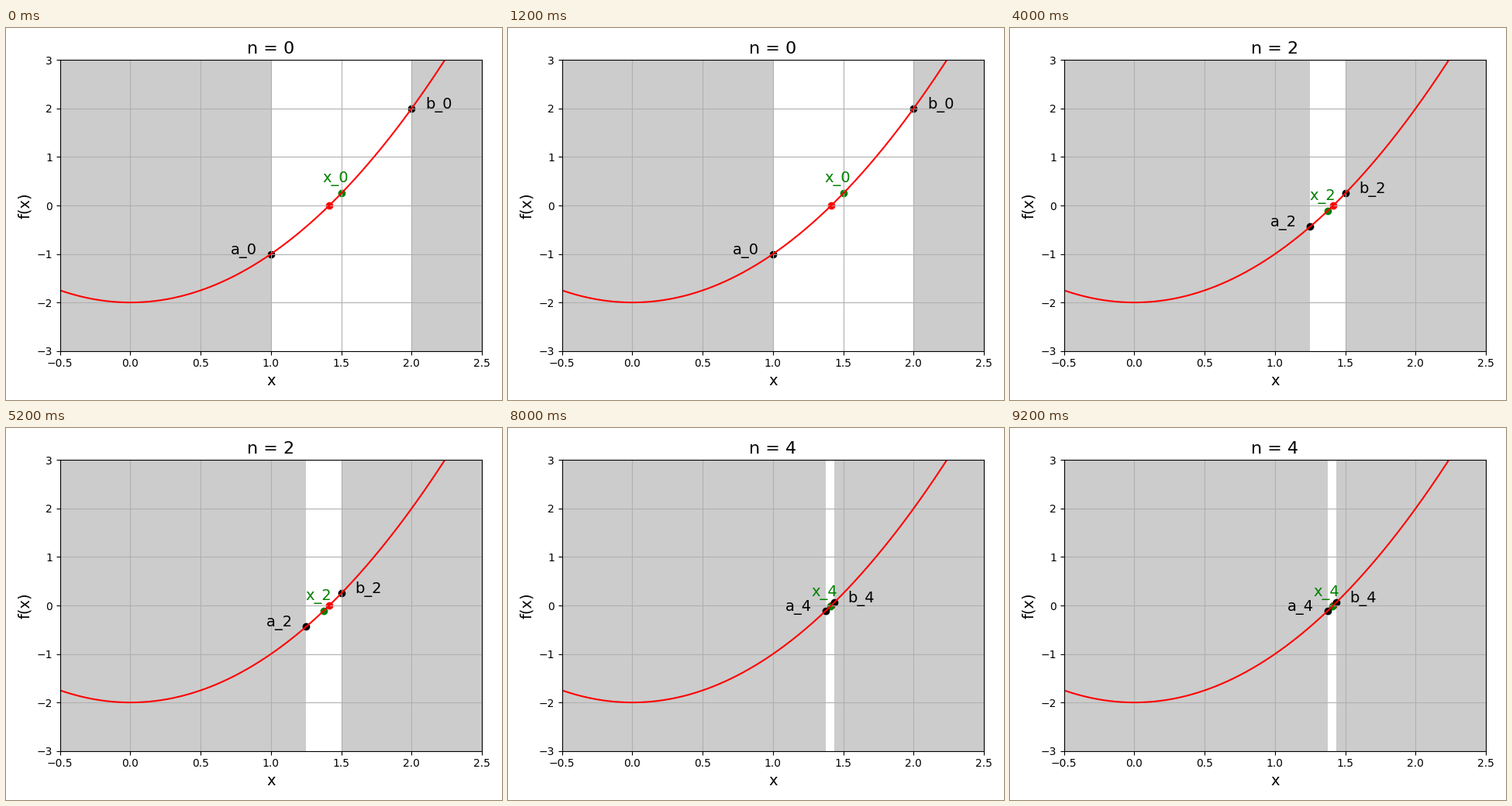
A matplotlib script that plays this animation: 640 px wide and 480 px high, repeating every 10 s.

```python
import numpy as np
import matplotlib.pyplot as plt
from matplotlib.animation import FuncAnimation

STEPS = 5
X_MIN, X_MAX = -0.5, 2.5
TOP = 1 - 41.33 / 480


def f(x):
    return x**2 - 2


def bisect(n, a=1.0, b=2.0):
    """Bracket and midpoint after n halvings."""
    for _ in range(n):
        mid = (a + b) / 2
        if f(a) * f(mid) <= 0:
            b = mid
        else:
            a = mid
    return a, b, (a + b) / 2


plt.rcParams["font.family"] = "DejaVu Sans"
fig, ax = plt.subplots(figsize=(6.4, 4.8), dpi=100)


def mark(x, label, color, offset):
    ax.scatter(x, f(x), color=color)
    ax.annotate(label, (x, f(x)), xytext=offset, textcoords="offset points",
                color=color, fontsize=14, ha="center")


def draw(n):
    ax.clear()
    a, b, mid = bisect(n)
    xs = np.linspace(X_MIN, X_MAX, 301)

    for left, right in ((X_MIN, a), (b, X_MAX)):
        ax.axvspan(left, right, facecolor="black", alpha=0.2, linewidth=0)
    ax.plot(xs, f(xs), color="red")
    ax.scatter(np.sqrt(2), 0, color="red")
    mark(mid, f"x_{n}", "green", (-5, 10))
    mark(a, f"a_{n}", "black", (-25, 0))
    mark(b, f"b_{n}", "black", (25, 0))

    ax.set_xlim(X_MIN, X_MAX)
    ax.set_ylim(-3, 3)
    ax.set_xlabel("x", fontsize=14)
    ax.set_ylabel("f(x)", fontsize=14)
    ax.set_title(f"n = {n}", fontsize=16)
    ax.grid(True)
    fig.tight_layout()
    fig.subplots_adjust(top=TOP)
    return []


anim = FuncAnimation(fig, draw, frames=STEPS, init_func=lambda: [],
                     interval=2000, repeat=True, repeat_delay=0)
plt.show()
```
